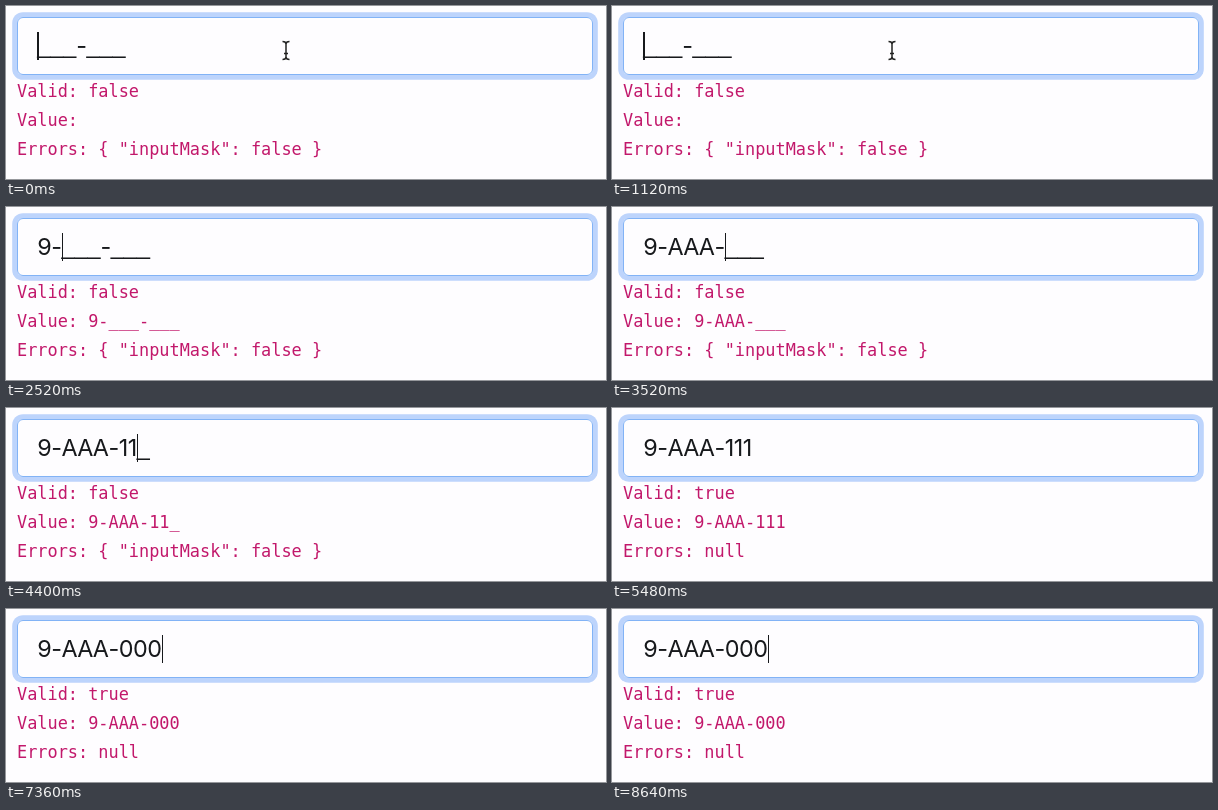
Recreate the animation shown at these times as an HTML page. Size 600x173 px, loop 8680 ms.

```html
<!DOCTYPE html>
<html lang="en">
<head>
<meta charset="utf-8">
<title>Input mask</title>
<style>
  html, body { margin: 0; width: 100%; height: 100%; overflow: hidden; background: #fefdff; }
  #stage { position: relative; width: 600px; height: 173px; overflow: hidden; }
  #field {
    position: absolute; left: 11px; top: 11px; width: 576px; height: 58px;
    box-sizing: border-box; border: 1.3px solid #82b3f6; border-radius: 6px;
    box-shadow: 0 0 0 4.8px #bdd4fc;
  }
  #text {
    position: absolute; left: 31.3px; top: 25px; white-space: pre; color: #17191c;
    font: 23.4px/30px Inter, sans-serif; letter-spacing: -.5px;
    font-feature-settings: "calt" 0, "kern" 0;
  }
  #text i { font: 23.4px/20px "Liberation Sans", sans-serif; letter-spacing: 0; position: relative; top: -1.5px; }
  #caret { display: inline-block; width: 1.4px; height: 28px; margin-right: -1.4px; vertical-align: -5.5px; background: #17191c; }
  #info {
    position: absolute; left: 11px; top: 71px; margin: 0; color: #c2186b;
    font: 16.9px/29px "DejaVu Sans Mono", monospace;
  }
  #mouse { position: absolute; left: 274px; top: 33px; fill: none; }
</style>
</head>
<body>
<div id="stage">
  <div id="field"></div>
  <div id="text"><span id="before"></span><span id="caret"></span><span id="after"></span></div>
  <pre id="info"></pre>
  <svg id="mouse" width="13" height="23">
    <path id="beam" d="M2.5 2.5Q6 2.5 6 5Q6 2.5 9.5 2.5M6 5V18M2.5 20.5Q6 20.5 6 18Q6 20.5 9.5 20.5M4 14.5H8" stroke="#fff" stroke-width="3"/>
    <use href="#beam" style="stroke:#222"/>
    <path d="M2.5 2.5Q6 2.5 6 5Q6 2.5 9.5 2.5M6 5V18M2.5 20.5Q6 20.5 6 18Q6 20.5 9.5 20.5M4 14.5H8" stroke="#222" stroke-width="1.5"/>
  </svg>
</div>
<script>
const LOOP = 8680, BLINK = 500, MASK = '9-___-___';
// [time of the key press, text before the caret]
const keys = [
  [-360, ''], [2100, '9-'],
  [2840, '9-A'], [3080, '9-AA'], [3320, '9-AAA-'],
  [4040, '9-AAA-1'], [4320, '9-AAA-11'], [4600, '9-AAA-111'],
  [5600, '9-AAA-11'], [5800, '9-AAA-1'], [6000, '9-AAA-'],
  [6800, '9-AAA-0'], [7000, '9-AAA-00'], [7200, '9-AAA-000']
];
const $ = id => document.getElementById(id);
let shown = null;

function show(typed) {
  const rest = typed ? MASK.slice(typed.length) : '___-___';
  const valid = !rest;
  $('before').textContent = typed;
  $('after').innerHTML = rest.replace(/_+/g, '<i>$&</i>');
  $('info').textContent = `Valid: ${valid}\nValue: ${typed && typed + rest}\n` +
    `Errors: ${valid ? 'null' : '{ "inputMask": false }'}`;
  $('mouse').style.display = typed ? 'none' : '';
  shown = typed;
}

function draw(now) {
  const t = now % LOOP;
  const [since, typed] = keys.findLast(key => key[0] <= t);
  if (typed !== shown) show(typed);
  $('caret').style.opacity = Math.floor((t - since) / BLINK) % 2 ? 0 : 1;
  requestAnimationFrame(draw);
}
draw(performance.now());
</script>
</body>
</html>
```
